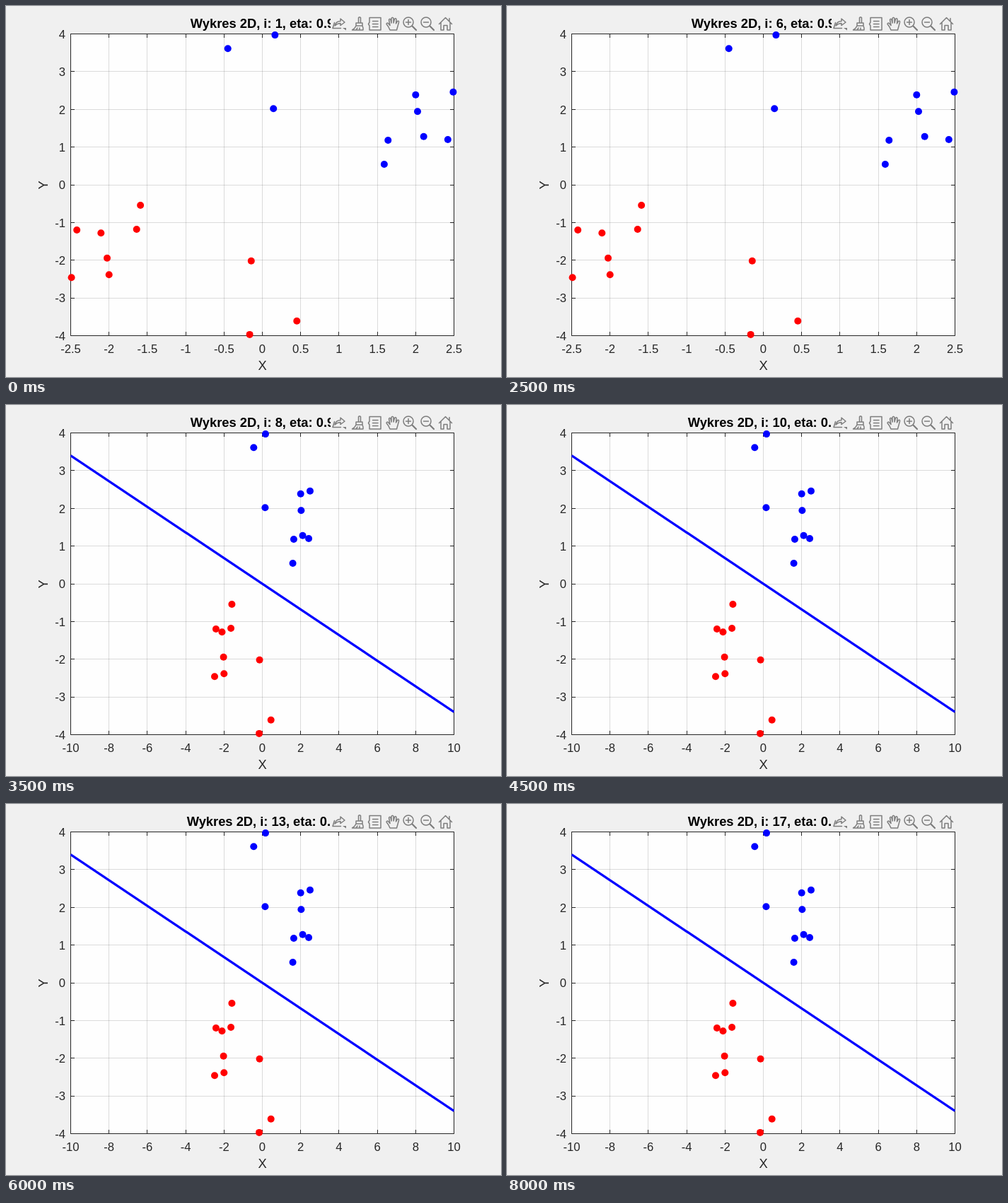
These frames come from a looping animation (700x525 px, 8500 ms). An HTML page:

```html
<!DOCTYPE html>
<html lang="pl">
<head>
<meta charset="utf-8">
<style>
html, body { margin: 0; width: 100%; height: 100%; overflow: hidden; background: #f0f0f0; }
svg { display: block; }
text { font-family: "Liberation Sans", Arial, sans-serif; font-size: 16.67px; fill: #262626; }
.title { font-size: 18.33px; font-weight: bold; fill: #000; }
.label { font-size: 18.33px; }
.icon { fill: none; stroke: #7d7d7d; stroke-width: 1.5; stroke-linejoin: round; stroke-linecap: round; }
</style>
</head>
<body>
<svg width="700" height="525" viewBox="0 0 700 525">
  <defs><clipPath id="area"><rect x="91" y="39" width="543" height="428"/></clipPath></defs>
  <rect width="700" height="525" fill="#f0f0f0"/>
  <rect x="91" y="39" width="543" height="428" fill="#fefefe"/>
  <path id="grid" stroke="#262626" stroke-opacity=".16" fill="none"/>
  <path id="axes" stroke="#262626" fill="none"/>
  <g id="ticks"></g>
  <text class="label" x="362.7" y="515" text-anchor="middle">X</text>
  <text class="label" id="ylabel" text-anchor="middle">Y</text>
  <path id="line" stroke="#00f" stroke-width="3.33" fill="none" clip-path="url(#area)"/>
  <g id="dots"></g>
  <text class="title" id="title" x="362.5" y="31" text-anchor="middle"></text>
  <rect x="459" y="13" width="175" height="24" fill="#f0f0f0"/>
  <g class="icon">
    <path d="M464.5 23.5L462 31.5H473.5M465 28C466 23.5 469 21.5 473 21.5V18L479 23L473 27.5V24.5C470 24.5 467.500 25.500 465 28Z"/>
    <path d="M476 31H481V34.500Z" fill="#7d7d7d" stroke="none"/>
    <path d="M498.500 16.500Q500 15 501.500 16.500V24H498.500ZM495 24H504V28H495ZM495 28Q493.500 32 489.500 34H505Q505.500 31 504 28M495 34L497 31M500 34V31"/>
    <path d="M514 16.500H530V34H514V28L512.500 25.500L514 23ZM518.500 21.500H526M518.500 25.500H526M518.500 29.500H526"/>
    <path d="M543 34Q541 29 538 25.500Q538.500 23 541 25L543 27.500L541.500 19.500Q542.500 17 544 19.500L545 24V17.500Q546.500 15 548 17.500V24L549.500 18.500Q551.500 16.500 552 19L551.500 25L553.500 21.500Q556 20.500 555.500 23L552.500 34Z"/>
    <g id="zoom"><circle cx="569" cy="23" r="7"/><path d="M574.500 28.500L580 34" stroke-width="2.200"/><path d="M565.500 23H572.500"/></g>
    <path d="M569 19.500V26.500"/>
    <use href="#zoom" x="25"/>
    <path d="M612.500 25.500L621.500 16.500L630.500 25.500M615 23.500V34H619V27.500H624V34H628V23.500M627 21.500V17.500"/>
  </g>
</svg>
<script>
const $ = id => document.getElementById(id);
const NS = "http://www.w3.org/2000/svg";
const box = { l: 91.5, r: 633.5, t: 39.5, b: 466.5 };
const STEP = 500, COUNT = 17;

// Each blue point has a red twin mirrored through the origin.
const points = [
  [-0.45, 3.61], [0.165, 3.97], [0.145, 2.02], [2, 2.385], [2.49, 2.46],
  [2.025, 1.945], [1.64, 1.18], [2.105, 1.28], [2.42, 1.2], [1.59, 0.545]
];

const views = [
  { xMax: 2.5, dx: 0.5, yMin: -4, dy: 1, labelX: 59 },
  { xMax: 10, dx: 2, yMin: -16, dy: 2, labelX: 49, ends: [1.76, -15] },
  { xMax: 10, dx: 2, yMin: -4, dy: 1, labelX: 59, ends: [3.4, -3.4] }
];

function add(parent, tag, attrs, text) {
  const el = document.createElementNS(NS, tag);
  for (const k in attrs) el.setAttribute(k, attrs[k]);
  if (text !== undefined) el.textContent = text;
  parent.appendChild(el);
}

function drawView(v) {
  const px = x => box.l + (x + v.xMax) / (2 * v.xMax) * (box.r - box.l);
  const py = y => box.t + (4 - y) / (4 - v.yMin) * (box.b - box.t);
  const snap = n => Math.floor(n) + 0.5;
  let grid = "", axes = `M${box.l} ${box.t}H${box.r}V${box.b}H${box.l}Z`;
  $("ticks").replaceChildren();
  $("dots").replaceChildren();

  for (let x = -v.xMax; x <= v.xMax; x += v.dx) {
    const p = snap(px(x));
    if (Math.abs(x) < v.xMax) grid += `M${p} ${box.t}V${box.b}`;
    axes += `M${p} ${box.t}v5.500M${p} ${box.b}v-5.500`;
    add($("ticks"), "text", { x: px(x), y: 491, "text-anchor": "middle" }, x);
  }
  for (let y = v.yMin; y <= 4; y += v.dy) {
    const p = snap(py(y));
    if (y > v.yMin && y < 4) grid += `M${box.l} ${p}H${box.r}`;
    axes += `M${box.l} ${p}h5.500M${box.r} ${p}h-5.500`;
    add($("ticks"), "text", { x: 84, y: py(y) + 6.3, "text-anchor": "end" }, y);
  }
  $("grid").setAttribute("d", grid);
  $("axes").setAttribute("d", axes);
  $("ylabel").setAttribute("transform", `translate(${v.labelX} 253.500) rotate(-90)`);
  $("line").setAttribute("d", v.ends
    ? `M${box.l} ${py(v.ends[0])}L${box.r} ${py(v.ends[1])}` : "");

  for (const [sign, fill] of [[1, "#00f"], [-1, "#f00"]])
    for (const [x, y] of points)
      add($("dots"), "circle", { cx: px(sign * x), cy: py(sign * y), r: 5, fill });
}

let shown = 0, current = null;
function update(time) {
  const i = Math.floor(time / STEP) % COUNT + 1;
  if (i !== shown) {
    shown = i;
    $("title").textContent = `Wykres 2D, i: ${i}, eta: 0.9`;
    const view = views[i < 7 ? 0 : i === 7 ? 1 : 2];
    if (view !== current) drawView(current = view);
  }
}

const start = performance.now();
function tick() {
  update(performance.now() - start);
  requestAnimationFrame(tick);
}
tick();
</script>
</body>
</html>
```
